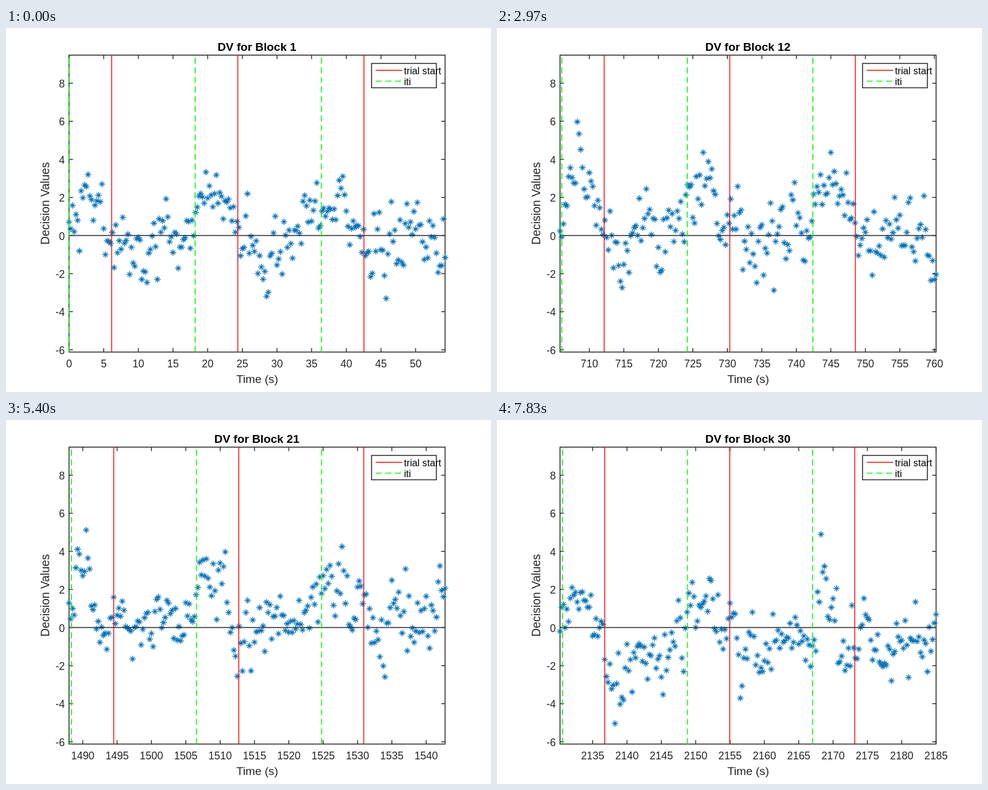
These frames come from a looping animation (808x606 px, 8 s). An HTML page with a canvas:

```html
<!DOCTYPE html>
<html lang="en">
<head>
<meta charset="utf-8">
<title>Decision values</title>
<style>
html, body { margin: 0; width: 100%; height: 100%; overflow: hidden; background: #fff; }
canvas { display: block; width: 808px; height: 606px; }
</style>
</head>
<body>
<canvas id="plot" width="808" height="606"></canvas>
<script>
const ctx = document.getElementById('plot').getContext('2d');
const LOOP = 8000, STEP = 270, COUNT = 30, PERIOD = 18.2, CUE = 6.15, DT = 0.25;
const L = 105, R = 731.5, T = 45.2, B = 539.5, ZERO = 345.5, UNIT = 31.7;
const INK = '#262626', RED = '#f00', GREEN = '#0f0', BLUE = '#0072bd';
const FONT = '"Liberation Sans", Arial, sans-serif';

// Key blocks: number, start second, length, mean level. A pause follows block 15.
const keys = [
  [1, 0, 54.25, 0],
  [8, 447.25, 54.5, -0.7],
  [12, 705.75, 54.5, 0.6],
  [15, 900.5, 54.5, 0.5],
  [16, 1160, 54.5, 0.5],
  [17, 1225, 54.5, 0.7],
  [21, 1488, 54.75, 0.5],
  [25, 1759.5, 54.5, -1.6],
  [30, 2130.25, 54.75, -0.7]
];

function random(seed) {
  let s = seed * 7919;
  return () => {
    s = (s + 0x6D2B79F5) | 0;
    let t = Math.imul(s ^ (s >>> 15), 1 | s);
    t = (t + Math.imul(t ^ (t >>> 7), 61 | t)) ^ t;
    return ((t ^ (t >>> 14)) >>> 0) / 4294967296;
  };
}

const bump = (x, mid, width) => Math.exp(-(((x - mid) / width) ** 2));
const quarter = x => Math.round(x * 4) / 4;

function keyAt(n) {
  const i = Math.max(1, keys.findIndex(k => k[0] >= n));
  const a = keys[i - 1], b = keys[i], f = (n - a[0]) / (b[0] - a[0]);
  return a.map((v, j) => v + (b[j] - v) * f);
}

// Values rise after each interval, dip after each cue and wander in between.
function makeBlock(n) {
  const rnd = random(n);
  const gauss = () => Math.sqrt(-2 * Math.log(1 - rnd())) * Math.cos(2 * Math.PI * rnd());
  const [, start, length, level] = keyAt(n);
  const span = quarter(length), values = [];
  let drift = 0;
  for (let s = 0; s <= span; s += DT) {
    const t = s % PERIOD;
    drift = 0.6 * drift + 0.75 * gauss();
    values.push(level + 2.4 * bump(t, 2.4, 2) - 0.7 * bump(t, 9, 3) + drift + 0.55 * gauss());
  }
  return { n, start: quarter(start), span, values };
}

const blocks = Array.from({ length: COUNT }, (_, i) => makeBlock(i + 1));

function line(x1, y1, x2, y2, color, width = 1.4, dash = []) {
  ctx.strokeStyle = color;
  ctx.lineWidth = width;
  ctx.setLineDash(dash);
  ctx.beginPath();
  ctx.moveTo(x1, y1);
  ctx.lineTo(x2, y2);
  ctx.stroke();
}

function box(x, y, w, h) {
  ctx.fillStyle = '#fff';
  ctx.fillRect(x, y, w, h);
  ctx.strokeStyle = INK;
  ctx.lineWidth = 1.5;
  ctx.setLineDash([]);
  ctx.strokeRect(x, y, w, h);
}

function text(str, x, y, size, align = 'center', color = INK, weight = '') {
  ctx.font = `${weight} ${size}px ${FONT}`;
  ctx.textAlign = align;
  ctx.fillStyle = color;
  ctx.fillText(str, x, y);
}

function drawStars(block) {
  ctx.strokeStyle = BLUE;
  ctx.lineWidth = 1.3;
  ctx.setLineDash([]);
  ctx.beginPath();
  block.values.forEach((v, i) => {
    const x = L + (R - L) * i / (block.values.length - 1), y = ZERO - v * UNIT;
    for (let a = 0; a < 4; a++) {
      const r = a % 2 ? 5 : 5.4;
      const dx = r * Math.cos(a * Math.PI / 4), dy = r * Math.sin(a * Math.PI / 4);
      ctx.moveTo(x - dx, y - dy);
      ctx.lineTo(x + dx, y + dy);
    }
  });
  ctx.stroke();
}

function drawAxes(block, scale) {
  box(L, T, R - L, B - T);
  for (let v = -6; v <= 8; v += 2) {
    const y = ZERO - v * UNIT;
    line(L, y, L + 6.5, y, INK);
    line(R, y, R - 6.5, y, INK);
    text(v, 98, y + 7, 17.5, 'right');
  }
  for (let s = Math.ceil(block.start / 5) * 5; s <= block.start + block.span; s += 5) {
    const x = L + (s - block.start) * scale;
    line(x, B, x, B - 6.5, INK);
    line(x, T, x, T + 6.5, INK);
    text(s, x, 565, 17.5);
  }
  text('Time (s)', 418.5, 590.5, 19.2);
  ctx.save();
  ctx.translate(72, 292);
  ctx.rotate(-Math.PI / 2);
  text('Decision Values', 0, 0, 19.4);
  ctx.restore();
  text('DV for Block ' + block.n, 418, 38, 19.2, 'center', '#000', 'bold');
}

function drawEvents(block, scale) {
  const first = L + Math.min(block.span - 54.25, 0.36) * scale;
  for (let k = 0; k < 3; k++) {
    const x = first + k * PERIOD * scale, cue = x + CUE * scale;
    line(cue, B, cue, T, RED);
    line(x, B, x, T, GREEN, 1.6, [10, 6]);
  }
}

function drawLegend() {
  box(609, 59, 108, 40.5);
  line(616, 70.5, 660, 70.5, RED);
  line(616, 88.5, 660, 88.5, GREEN, 1.6, [10, 6]);
  text('trial start', 663, 76.5, 16.2, 'left', '#000');
  text('iti', 663, 94.5, 16.2, 'left', '#000');
}

function draw(block) {
  const scale = (R - L) / block.span;
  ctx.fillStyle = '#fff';
  ctx.fillRect(0, 0, 808, 606);
  drawAxes(block, scale);
  drawStars(block);
  line(L, ZERO, R, ZERO, INK, 1.5);
  drawEvents(block, scale);
  drawLegend();
}

const origin = performance.now();
function tick() {
  const t = (performance.now() - origin) % LOOP;
  draw(blocks[Math.min(Math.floor(t / STEP), COUNT - 1)]);
  requestAnimationFrame(tick);
}
tick();
</script>
</body>
</html>
```
